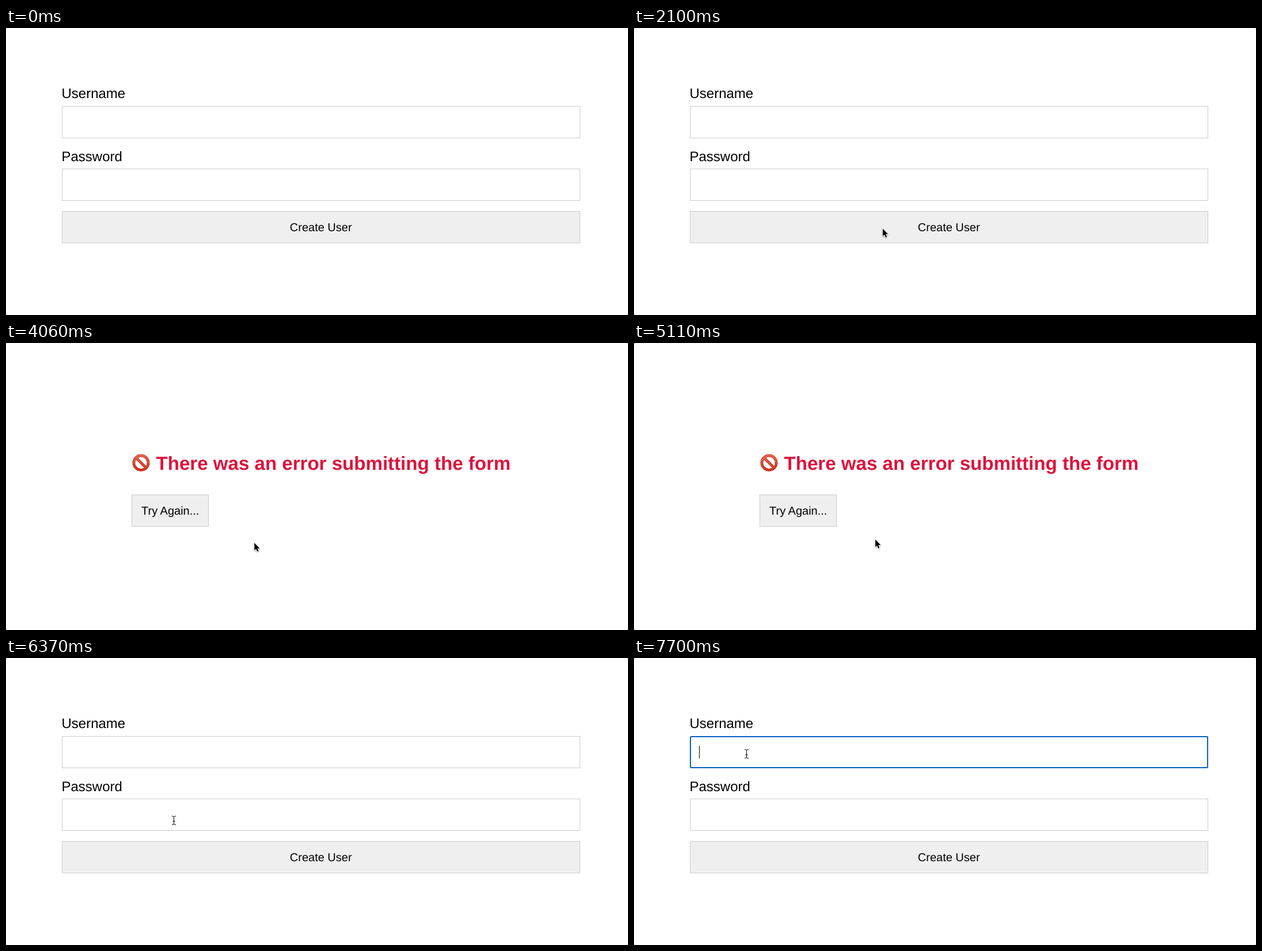
Animation, 1080 px wide and 500 px high, one loop 8000 ms. Source, as an HTML page:

```html
<!DOCTYPE html>
<html lang="en">
<head>
<meta charset="utf-8">
<title>Sign-up form</title>
<style>
  html, body { margin: 0; width: 100%; height: 100%; overflow: hidden; background: #fff; }
  svg { display: block; width: 100vw; height: 100vh; }
  text { font-family: "Liberation Sans", Arial, sans-serif; font-size: 20px; text-rendering: geometricPrecision; }
  .label { font-size: 24px; }
  .title { font-size: 33.1px; font-weight: bold; fill: crimson; }
  .box { fill: #fff; stroke: #ccc; }
  .button { fill: #efefef; stroke: #ccc; }
  .mid { text-anchor: middle; }
  .off { display: none; }
</style>
</head>
<body>
<svg viewBox="0 0 1080 500">
  <defs>
    <linearGradient id="red" gradientUnits="userSpaceOnUse" x1="0" y1="-15" x2="0" y2="15">
      <stop offset="0" stop-color="#ee6a4e"/>
      <stop offset="1" stop-color="#cf2f1b"/>
    </linearGradient>
    <g id="ban">
      <circle r="12.6"/>
      <path d="M-8.9 -8.9L8.9 8.9"/>
    </g>
    <path id="beam" d="M-3.5 -7.5H-2Q0 -7.5 0 -5.5Q0 -7.5 2 -7.5H3.5M0 -5.5V5.5M-3.5 7.5H-2Q0 7.5 0 5.5Q0 7.5 2 7.5H3.5M-2 1.5H2"/>
  </defs>

  <rect width="1080" height="500" fill="#777"/>
  <rect width="1080" height="500" rx="2" fill="#fff"/>

  <g id="form">
    <text class="label" x="96.5" y="122">Username</text>
    <rect class="box" x="97.5" y="136.5" width="899" height="55"/>
    <g id="focus">
      <rect x="98" y="137" width="898" height="54" rx="2" fill="#fff" stroke="#0860bf" stroke-width="2"/>
      <rect x="113" y="153" width="1" height="22"/>
    </g>
    <text class="label" x="96.5" y="232">Password</text>
    <rect class="box" x="97.5" y="245.5" width="899" height="55"/>
    <g id="ready">
      <rect class="button" x="97.5" y="319.5" width="899" height="55"/>
      <text class="mid" x="546.7" y="354">Create User</text>
    </g>
    <g id="saving">
      <rect class="box" x="97.5" y="319.5" width="899" height="55"/>
      <text class="mid" x="546.7" y="354" fill="#b5b5b5">Saving...</text>
    </g>
  </g>

  <g id="error">
    <g transform="translate(234.5 208.7)" fill="none">
      <use href="#ban" stroke="#a8301f" stroke-width="4.8"/>
      <use href="#ban" stroke="url(#red)" stroke-width="3.4"/>
    </g>
    <text class="title" x="260.5" y="221">There was an error submitting the form</text>
    <rect class="button" x="218.5" y="264.5" width="133" height="55"/>
    <text x="235" y="299">Try Again...</text>
  </g>

  <g id="pointer">
    <circle id="ring" fill="none" stroke="#000" stroke-opacity=".6" stroke-width="2"/>
    <g id="arrow" style="filter: drop-shadow(0 1px 1px rgba(0,0,0,.35))">
      <path d="M.3 .3V13.2L3.2 10.5L5.3 15.3L7.5 14.4L5.5 9.7H9.5Z" stroke="#fff" stroke-width="1.4" paint-order="stroke"/>
    </g>
    <g id="ibeam" fill="none" transform="translate(.5 0)">
      <use href="#beam" stroke="#fff" stroke-width="2.4"/>
      <use href="#beam" stroke="#000"/>
    </g>
  </g>
</svg>
<script>
const LOOP = 8000, TICK = 70;
const $ = id => document.getElementById(id);
const show = (id, on) => $(id).classList.toggle('off', !on);
const within = (t, a, b) => t >= a && t < b;

const easeOut = p => 1 - (1 - p) ** 2;
const easeBoth = p => p * p * (3 - 2 * p);

const moves = [
  { start: 1470, end: 2170, from: [496, 487], to: [431, 348], ease: easeOut },
  { start: 4970, end: 5740, from: [431, 348], to: [291, 283], ease: easeBoth },
  { start: 6790, end: 7490, from: [291, 283], to: [195, 167], ease: easeBoth }
];
const clicks = [
  { start: 2870, end: 3010, r: 20.5 },
  { start: 6160, end: 6300, r: 20.5 },
  { start: 7560, end: 7700, r: 15.5 }
];

function place(t) {
  const m = moves.filter(v => t >= v.start).pop() || moves[0];
  const p = m.ease(Math.max(0, Math.min(1, (t - m.start) / (m.end - m.start))));
  return m.from.map((a, i) => a + (m.to[i] - a) * p);
}

function draw(now) {
  const time = now % LOOP;
  const t = Math.floor(time / TICK + 1e-6) * TICK;
  const failed = within(t, 4060, 6300);
  const busy = within(t, 3010, 4060);
  const typing = t >= 6370;
  const click = clicks.find(c => within(t, c.start, c.end));

  show('form', !failed);
  show('error', failed);
  show('saving', busy);
  show('ready', !busy);
  show('focus', t >= 7560);
  show('pointer', t >= 1470);
  show('arrow', !typing);
  show('ibeam', typing);
  show('ring', !!click);
  if (click) $('ring').setAttribute('r', click.r);
  const [x, y] = place(t);
  $('pointer').setAttribute('transform', `translate(${x.toFixed(1)} ${y.toFixed(1)})`);
}

const origin = performance.now();
function frame() {
  draw(performance.now() - origin);
  requestAnimationFrame(frame);
}
draw(0);
requestAnimationFrame(frame);
</script>
</body>
</html>
```
